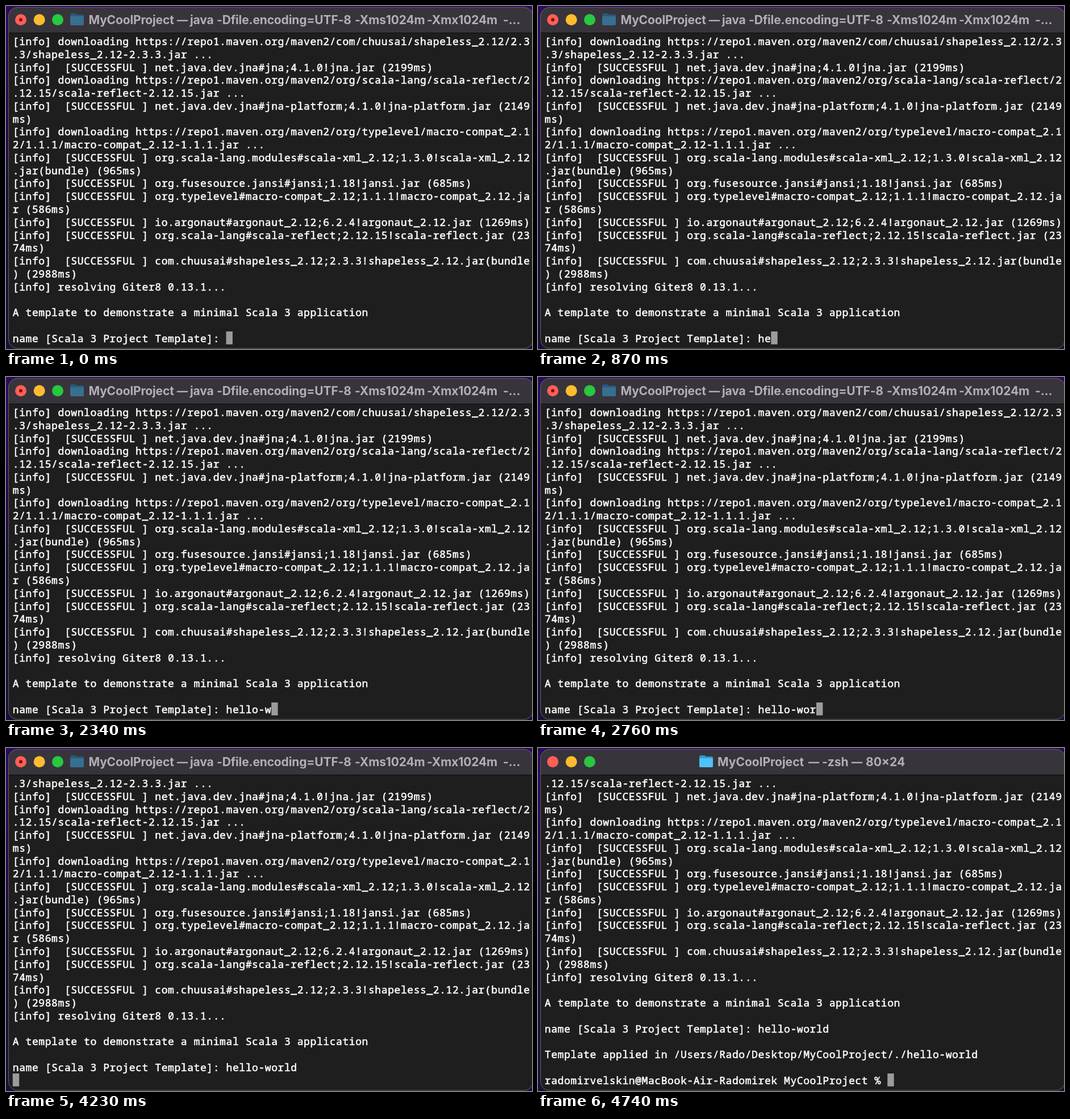
Write an HTML page with a canvas that moves like this. It is 926 px wide and 605 px high and loops after 5.07 s.

```html
<!DOCTYPE html>
<html lang="en">
<head>
<meta charset="utf-8">
<title>Terminal</title>
<style>
html, body { margin: 0; width: 100%; height: 100%; overflow: hidden; background: #1e1e1e; }
canvas { display: block; }
</style>
</head>
<body>
<canvas id="stage" width="926" height="605"></canvas>
<script>
const ctx = document.getElementById('stage').getContext('2d');
const LOOP = 5070;
const CELL = 11.385, ROW = 22.76, LEFT = 11.8, TOP = 50.6, ROWS = 24;
const MONO = '500 18px "Noto Sans Mono", "DejaVu Sans Mono", monospace';
const SANS = '700 21px Inter, "Liberation Sans", sans-serif';
const DASH = '700 21px "Noto Sans", "Open Sans", sans-serif';

const PROMPT = 'name [Scala 3 Project Template]: ';
const ANSWER = 'hello-world';
const KEYS = [450, 540, 930, 1080, 1260, 1770, 2340, 2490, 2760, 3180, 3270];
const ENTER = 4230, APPLIED = 4410, SHELL = 4620, RETITLE = 4680;

const LOG = `[info] downloading https://repo1.maven.org/maven2/com/chuusai/shapeless_2.12/2.3
.3/shapeless_2.12-2.3.3.jar ...
[info]  [SUCCESSFUL ] net.java.dev.jna#jna;4.1.0!jna.jar (2199ms)
[info] downloading https://repo1.maven.org/maven2/org/scala-lang/scala-reflect/2
.12.15/scala-reflect-2.12.15.jar ...
[info]  [SUCCESSFUL ] net.java.dev.jna#jna-platform;4.1.0!jna-platform.jar (2149
ms)
[info] downloading https://repo1.maven.org/maven2/org/typelevel/macro-compat_2.1
2/1.1.1/macro-compat_2.12-1.1.1.jar ...
[info]  [SUCCESSFUL ] org.scala-lang.modules#scala-xml_2.12;1.3.0!scala-xml_2.12
.jar(bundle) (965ms)
[info]  [SUCCESSFUL ] org.fusesource.jansi#jansi;1.18!jansi.jar (685ms)
[info]  [SUCCESSFUL ] org.typelevel#macro-compat_2.12;1.1.1!macro-compat_2.12.ja
r (586ms)
[info]  [SUCCESSFUL ] io.argonaut#argonaut_2.12;6.2.4!argonaut_2.12.jar (1269ms)
[info]  [SUCCESSFUL ] org.scala-lang#scala-reflect;2.12.15!scala-reflect.jar (23
74ms)
[info]  [SUCCESSFUL ] com.chuusai#shapeless_2.12;2.3.3!shapeless_2.12.jar(bundle
) (2988ms)
[info] resolving Giter8 0.13.1...

A template to demonstrate a minimal Scala 3 application
`.split('\n');

const BUSY = [['MyCoolProject', 145.5], ['—', 300], ['java', 324], ['-Dfile.encoding=UTF-8', 371],
  ['-Xms1024m', 614], ['-Xmx1024m', 741], ['-...', 875]];
const IDLE = [['MyCoolProject', 316], ['—', 475], ['-zsh', 500], ['—', 551], ['80×24', 577]];

function disc(x, y, r, color) {
  ctx.fillStyle = color;
  ctx.beginPath();
  ctx.arc(x, y, r, 0, Math.PI * 2);
  ctx.fill();
}

function box(x, y, w, h, r, color) {
  ctx.fillStyle = color;
  ctx.beginPath();
  ctx.roundRect(x, y, w, h, r);
  ctx.fill();
}

function folder(x, back, front) {
  box(x, 13, 11, 8, 2, back);
  box(x, 15, 24, 18, 2, back);
  box(x, 18, 24, 16, 2, front);
}

// Terminal contents at time t; the cursor follows the last line
function screen(t) {
  const typed = KEYS.filter(k => k <= t).length;
  const lines = [...LOG, PROMPT + ANSWER.slice(0, typed)];
  if (t >= APPLIED) lines.push('', 'Template applied in /Users/Rado/Desktop/MyCoolProject/./hello-world', '');
  if (t >= ENTER) lines.push(t >= SHELL ? 'radomirvelskin@MacBook-Air-Radomirek MyCoolProject % ' : '');
  return lines.slice(-ROWS);
}

function drawWindow() {
  const sky = ctx.createLinearGradient(0, 0, 0, 605);
  sky.addColorStop(0, '#2d0b5c');
  sky.addColorStop(0.5, '#1d0d40');
  sky.addColorStop(1, '#1b0d3c');
  ctx.fillStyle = sky;
  ctx.fillRect(0, 0, 926, 605);

  ctx.save();
  ctx.beginPath();
  ctx.roundRect(4, 2, 924, 602.5, 16);
  ctx.clip();
  ctx.fillStyle = '#1e1e1e';
  ctx.fillRect(0, 0, 930, 605);
  ctx.fillStyle = '#38343b';
  ctx.fillRect(0, 0, 930, 47);
  ctx.fillStyle = '#0c0b0d';
  ctx.fillRect(0, 47, 930, 1);
  ctx.restore();

  ctx.strokeStyle = '#67626b';
  ctx.lineWidth = 1;
  ctx.beginPath();
  ctx.roundRect(4.5, 2.5, 923, 601.5, 15.5);
  ctx.stroke();
}

function drawTitle(idle) {
  disc(26, 24.3, 10, '#ff5f57');
  if (!idle) disc(26, 24.3, 3, '#7e0d08');
  disc(58.7, 24.3, 10, '#febc2e');
  disc(91, 24.3, 10, '#28c840');
  if (idle) folder(284, '#1e9fdc', '#4fc3f7');
  else folder(113, '#28587a', '#376f91');

  ctx.letterSpacing = idle ? '0px' : '-0.15px';
  ctx.fillStyle = '#b3afb5';
  for (const [word, x] of idle ? IDLE : BUSY) {
    ctx.font = word === '—' ? DASH : SANS;
    ctx.fillText(word, x, 31.5);
  }
}

function drawText(lines) {
  const last = lines.length - 1;
  ctx.fillStyle = '#9c9b9c';
  ctx.fillRect(LEFT + lines[last].length * CELL, TOP + last * ROW, CELL, ROW);

  ctx.font = MONO;
  ctx.letterSpacing = '0px';
  ctx.letterSpacing = CELL - ctx.measureText('0').width + 'px';
  ctx.fillStyle = ctx.strokeStyle = '#ffffff';
  ctx.lineWidth = 0.55;
  ctx.lineJoin = 'round';
  lines.forEach((line, i) => {
    const y = TOP + 18.5 + i * ROW;
    ctx.fillText(line, LEFT, y);
    ctx.strokeText(line, LEFT, y);
  });
}

function frame(now) {
  const t = now % LOOP;
  drawWindow();
  drawTitle(t >= RETITLE);
  drawText(screen(t));
}

const start = performance.now();
function tick() {
  frame(performance.now() - start);
  requestAnimationFrame(tick);
}
tick();
</script>
</body>
</html>
```
